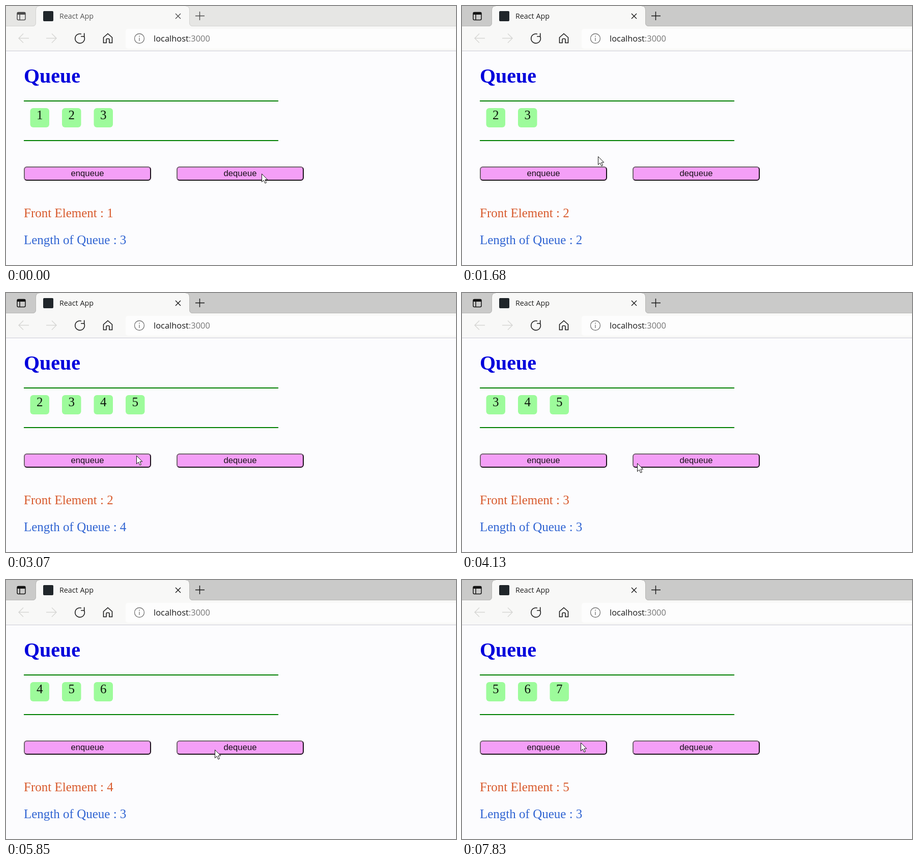
Recreate the animation shown at these times as an HTML page with a canvas. Size 884x510 px, loop 8000 ms.

```html
<!DOCTYPE html>
<html lang="en">
<head>
<meta charset="utf-8">
<title>Queue</title>
<style>
  html, body { margin: 0; width: 100%; height: 100%; overflow: hidden; background: #fcfcfe; }
  canvas { display: block; }
</style>
</head>
<body>
<canvas id="stage" width="884" height="510"></canvas>
<script>
const ctx = document.getElementById('stage').getContext('2d');
const LOOP = 8000;
const HOLD = 140;   // how long a click keeps the button down
const LAG = 80;     // from release to the new queue
const SERIF = '"Liberation Serif", "Times New Roman", serif';
const SANS = '"Liberation Sans", Arial, sans-serif';
const UI = '"Open Sans", "Noto Sans", sans-serif';

const enqueue = { label: 'enqueue', x: 35, clicks: [2060, 2650, 4480, 7590] };
const dequeue = { label: 'dequeue', x: 335, clicks: [130, 3550, 5610, 6650] };

const home = { x: 502, y: 330 };
const moves = [
  { at: 1350, ms: 340, x: 267, y: 296 },
  { at: 1690, ms: 340, x: 234, y: 317 },
  { at: 2930, ms: 570, x: 380, y: 336 },
  { at: 3950, ms: 510, x: 256, y: 334 },
  { at: 4850, ms: 720, x: 410, y: 334 },
  { at: 6880, ms: 660, x: 233, y: 320 }
];

const clamp = v => Math.min(1, Math.max(0, v));
const smooth = p => p * p * (3 - 2 * p);
const done = (button, t) => button.clicks.filter(c => t >= c + HOLD + LAG).length;
const isDown = (button, t) => button.clicks.some(c => t >= c && t < c + HOLD);

function pointerAt(t) {
  return moves.reduce((from, to) => {
    const p = smooth(clamp((t - to.at) / to.ms));
    return { x: from.x + (to.x - from.x) * p, y: from.y + (to.y - from.y) * p };
  }, home);
}

function rect(x, y, w, h, color, radius = 0) {
  ctx.fillStyle = color;
  ctx.beginPath();
  ctx.roundRect(x, y, w, h, radius);
  ctx.fill();
}

function text(str, x, y, font, color, align = 'left') {
  ctx.font = font;
  ctx.fillStyle = color;
  ctx.textAlign = align;
  ctx.fillText(str, x, y);
}

function stroke(path, color, width = 1.5) {
  ctx.strokeStyle = color;
  ctx.lineWidth = width;
  ctx.stroke(new Path2D(path));
}

function drawBrowser(active) {
  const ink = active ? '#141414' : '#4b4b4b';
  const edge = active ? '#b8b8b6' : '#d3d3d1';
  const toolbar = '#f8f8f7';
  const dark = '#1a1a1a', faint = '#d6d6d4', muted = '#757575';

  rect(0, 0, 884, 40, active ? '#cacac9' : '#e6e6e4');
  stroke('M0 39.5H884', edge, 1);
  ctx.fillStyle = toolbar;
  ctx.fill(new Path2D('M52 40Q59 40 59 33V8Q59 0 67 0H352Q360 0 360 8V33Q360 40 367 40Z'));
  stroke('M52 39.5Q58.5 39.5 58.5 33V8Q58.5 0 66 0M353 0Q360.5 0 360.5 8V33Q360.5 39.5 367 39.5', edge, 1);

  // tab actions icon
  stroke('M24.5 12.5H35.5Q38 12.5 38 15V25Q38 27.5 35.5 27.5H24.5Q22 27.5 22 25V15Q22 12.5 24.5 12.5ZM27 16V27', ink);
  rect(22, 12, 16, 5, ink, [2, 2, 0, 0]);

  rect(73, 10, 20, 20, '#20262a', 2);
  text('React App', 105, 25, '14.3px ' + UI, active ? '#1d1d1d' : '#555');
  stroke('M333 15L343 25M343 15L333 25', ink, 1.4);
  stroke('M372 19.5H390M380.5 11V28', ink, 1.4);

  rect(0, 40, 884, 48, toolbar);
  rect(235, 45, 660, 39, '#fdfdfd', 5);
  stroke('M0 88.5H884', '#cacad4', 1);

  // back, forward, reload, home, site info
  stroke('M45 63.5H25M34 54.5L25 63.5L34 72.5', faint, 1.4);
  stroke('M79 63.5H99M90 54.5L99 63.5L90 72.5', faint, 1.4);
  stroke('M153.2 59.5A9.3 9.3 0 1 1 148 55.2M153.7 53.5V60H147.2', dark, 1.6);
  stroke('M191.5 62L200 54.5L208.5 62V72.5H203V66Q203 64.5 201.5 64.5H198.5Q197 64.5 197 66V72.5H191.5Z', dark, 1.6);
  stroke('M271.5 64A9.5 9.5 0 1 1 252.5 64A9.5 9.5 0 1 1 271.5 64M262 62.5V69', muted, 1.3);
  rect(261, 58.5, 2, 2, muted, 1);

  const font = '16.45px ' + UI;
  text('localhost', 290, 70, font, dark);
  text(':3000', 290 + ctx.measureText('localhost').width, 70, font, muted);
}

function drawQueue(first, last) {
  text('Queue', 35, 151, 'bold 40px ' + SERIF, '#0000dc');
  rect(35, 186, 500, 2, '#008000');
  rect(35, 264, 500, 2, '#008000');
  for (let n = first; n <= last; n++) {
    const x = 47.5 + (n - first) * 62.5;
    rect(x, 201, 37.5, 38, '#9dfb9b', 6);
    text(n, x + 18.75, 223, '25px ' + SERIF, '#0c140c', 'center');
  }
  text('Front Element : ' + first, 35, 416, '25px ' + SERIF, '#d85a2c');
  text('Length of Queue : ' + (last - first + 1), 35, 469, '25px ' + SERIF, '#3064d2');
}

function drawButton({ label, x }, pressed) {
  const y = 316, w = 250, h = 28;
  const light = '#72666f', dark = '#1a121a';
  const half = (area, color) => {
    ctx.save();
    ctx.clip(new Path2D(area));
    ctx.beginPath();
    ctx.roundRect(1, 1, w - 2, h - 2, 5);
    ctx.strokeStyle = color;
    ctx.lineWidth = 2;
    ctx.stroke();
    ctx.restore();
  };

  ctx.save();
  ctx.translate(x + w / 2, y + h / 2);
  if (pressed) ctx.scale(1.028, 1.028);
  ctx.translate(-w / 2, -h / 2);
  rect(0, 0, w, h, '#f49ff7', 6);
  half(`M0 0H${w}L${w - 14} 14H14L0 ${h}Z`, pressed ? dark : light);
  half(`M${w} ${h}H0L14 14H${w - 14}L${w} 0Z`, pressed ? light : dark);
  text(label, w / 2, 19, '16.67px ' + SANS, '#181018', 'center');
  ctx.restore();
}

function drawPointer({ x, y }) {
  ctx.save();
  ctx.translate(Math.round(x) + 0.5, Math.round(y) + 0.5);
  const arrow = new Path2D('M0 0V16L3.7 12.5L6.4 18.5L9 17.4L6.4 11.5H11.3Z');
  ctx.fillStyle = '#fff';
  ctx.fill(arrow);
  ctx.strokeStyle = '#141414';
  ctx.lineWidth = 1;
  ctx.stroke(arrow);
  ctx.restore();
}

function draw(t) {
  rect(0, 0, 884, 510, '#fcfcfe');
  drawBrowser(t >= dequeue.clicks[0]);
  drawQueue(1 + done(dequeue, t), 3 + done(enqueue, t));
  for (const button of [enqueue, dequeue]) drawButton(button, isDown(button, t));
  drawPointer(pointerAt(t));
}

const start = performance.now();
function tick() {
  draw((performance.now() - start) % LOOP);
  requestAnimationFrame(tick);
}
tick();
</script>
</body>
</html>
```
